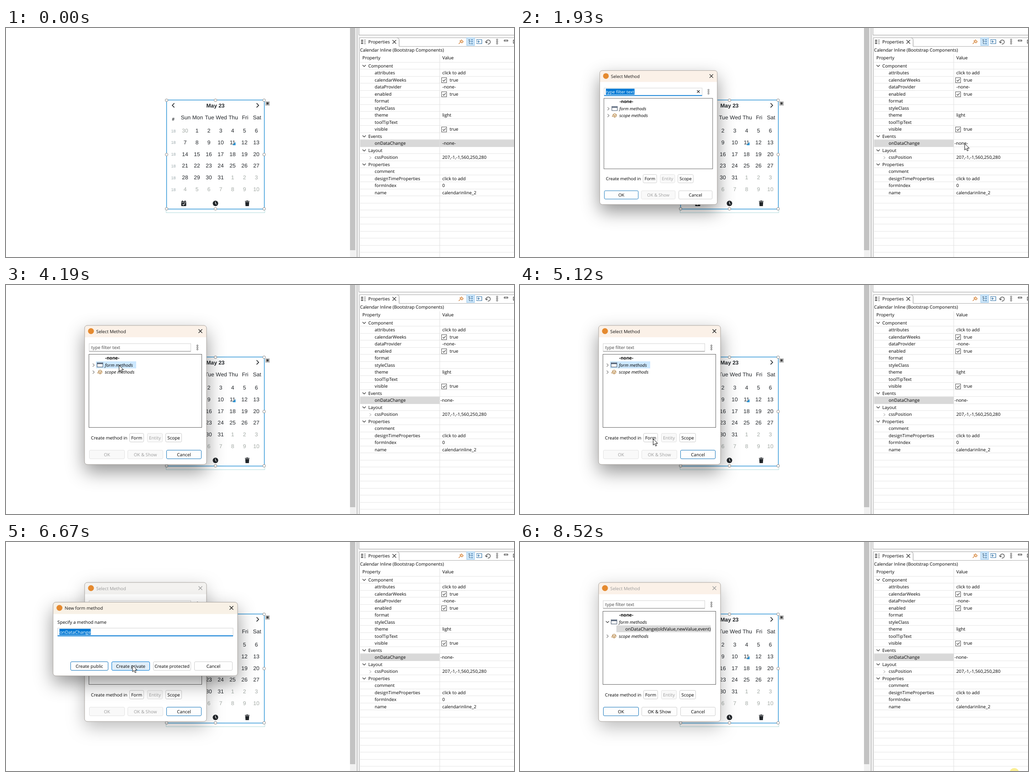
An HTML page that plays this animation: 1112x504 px, repeating every 8.59 s.

```html
<!DOCTYPE html>
<html lang="en">
<head>
<meta charset="utf-8">
<title>Calendar event handler</title>
<style>
  html, body { margin: 0; height: 100%; overflow: hidden; background: #fff; }
  svg { display: block; width: 1112px; height: 504px; text-rendering: geometricPrecision; }
  text { font: 9.8px "Open Sans", sans-serif; white-space: pre; }
  .cal text { font: 12px "Liberation Sans", Arial, sans-serif; text-anchor: middle; fill: #212529; }
  .cal .week { font-size: 9px; fill: #9aa8ab; }
  .cal .other { fill: #a3aaa5; }
  .bold, .cal .bold { font-weight: bold; }
  .italic { font-style: italic; }
  .mid { text-anchor: middle; }
</style>
</head>
<body>
<svg viewBox="0 0 1112 504"><g id="under"></g><g id="fixed"></g><g id="over"></g></svg>
<script>
const LOOP = 8590, ROW = 15.5, ROWS_TOP = 75.6, SELECTED = 11;
const BLUE = '#0078d4', PEACH = '#fbf1e8', PALE = '#f3f2f0';
const $ = id => document.getElementById(id);

const text = (x, y, s, attrs = '') => `<text x="${x}" y="${y}" ${attrs}>${s}</text>`;
const rect = (x, y, w, h, fill, attrs = '') =>
  `<rect x="${x}" y="${y}" width="${w}" height="${h}" fill="${fill}" ${attrs}/>`;
const path = (d, stroke = '#222', width = 1, fill = 'none') =>
  `<path d="${d}" stroke="${stroke}" stroke-width="${width}" fill="${fill}"/>`;
const circle = (x, y, r, fill, attrs = '') => `<circle cx="${x}" cy="${y}" r="${r}" fill="${fill}" ${attrs}/>`;
const cross = (x, y, r, color, width = 1) =>
  path(`M${x - r} ${y - r}l${2 * r} ${2 * r}m0 ${-2 * r}l${-2 * r} ${2 * r}`, color, width);
const right = (x, y, r, color, width) => path(`M${x - r / 2} ${y - r}l${r} ${r}l${-r} ${r}`, color, width);
const down = (x, y) => path(`M${x - 3.5} ${y - 1.8}l3.5 3.5l3.5 -3.5`, '#333', 1.2);
const dots = (x, y, gap) => [-gap, 0, gap].map(d => circle(x, y + d, 1.5, '#fff', 'stroke="#444" stroke-width=".9"')).join('');

function calendar() {
  let s = path('M350.5 398V406.5H566.5V398', '#b4dcdf') + rect(351.5, 158.5, 214, 240, '#fff', 'stroke="#2a93d5" stroke-width="1.4"');
  s += path('M368.5 165.5l-4.5 4.7l4.5 4.7M548.5 165.5l4.5 4.7l-4.5 4.7', '#212529', 1.6);
  s += text(458.5, 174.5, 'May 23', 'class="bold"') + text(366, 204, '#', 'style="font-size:10px" class="bold"');
  'Sun Mon Tue Wed Thu Fri Sat'.split(' ').forEach((d, i) => s += text(393.5 + 26 * i, 201.3, d));
  for (let i = 0; i < 42; i++) {
    const col = i % 7, y = 230 + 25.8 * Math.floor(i / 7);
    const other = i < 1 || i > 31;
    if (!col) s += text(366.5, y - .5, 18, 'class="week"');
    s += text(392 + 26 * col, y, i < 1 ? 30 : (i - 1) % 31 + 1, other ? 'class="other"' : '');
  }
  s += path('M502.5 251v7h-7z', 'none', 0, '#2a93d5');
  // footer icons
  s += rect(383.5, 381.5, 11, 10.5, '#212529', 'rx="1.3"') + path('M386 379.5v3M392 379.5v3', '#212529', 1.6)
     + path('M383.5 384h11', '#fff', .8) + path('M386.5 387.8l1.8 1.8l3.3 -3.4', '#fff', 1.2);
  s += circle(458.5, 386, 6, '#212529') + path('M458.5 382.3v4l2.4 1.6', '#fff', 1.2);
  s += path('M523 381.5h10M526.3 380.5h3.4', '#212529', 1.5) + path('M523.7 383h8.6l-.6 9h-7.4z', 'none', 0, '#212529');
  // resize handles
  for (const x of [351.5, 458.5, 565]) for (const y of [159, 278.5, 398])
    if (x !== 458.5 || y !== 278.5) s += circle(x, y, 3, '#fff', 'stroke="#888"');
  s += rect(568.5, 162.5, 8, 7.5, '#eee', 'stroke="#888"') + rect(570, 163.5, 5, 5, '#444');
  return `<g class="cal">${s}</g>`;
}

function frameAndToolbar() {
  let s = rect(753, 0, 12, 504, '#f1f1f1') + rect(753, 0, 11.5, 489, '#c3c3c3');
  s += rect(765, 0, 9, 504, '#f2f2f2') + path('M768.5 0V504', '#a0a0a0') + path('M772.5 0V15.5H1112', '#a8a8a8');
  s += rect(773, 16, 339, 5, '#f5f5f5') + path('M773.5 504V21.5H1112M860.5 40.5H1112', '#b0b0b0');
  s += path('M860.5 40.5V27q0 -5.5 -5 -5.5', '#999');
  s += path('M777 27h5M777 30.5h5M777 34h5', '#555', 2) + path('M784 26.5h4M784 30.5h4M784 34.5h4M785.5 25v11', '#999');
  s += text(793, 34, 'Properties') + cross(850, 30.5, 4, '#333', 1.1);
  s += path('M991 35l4 -4M993 28l5 5M994 29l3 -3l4 4l-3 3z', '#d1813a', 1.2, '#fbe3c8');
  s += rect(1008.5, 21.5, 17, 17, '#cde6f9', 'stroke="#99c9ee"') + path('M1014 25v9.5h3M1014 29.5h3M1012 26h4', '#4a6a85')
     + path('M1018 26h4M1018 30h4M1018 34.5h4', '#3d78ad', 1.5);
  s += path('M1030.5 28v-2.5h11v9h-11v-2M1029 30h7m-2.5 -2.5l2.5 2.5l-2.5 2.5', '#3a78aa', 1.2);
  s += path('M1051.5 32.5a4.5 4.5 0 1 1 3 2.7M1049 29.5l2.5 3.5l3 -2.5', '#444', 1.2);
  s += dots(1075, 30, 4.2) + rect(1090.5, 26.5, 8, 2.5, '#fff', 'stroke="#333"') + rect(1110.5, 26.5, 8, 7, '#fff', 'stroke="#333"');
  return s;
}

const PROPERTIES = ['*Component', 'attributes|click to add', 'calendarWeeks|true', 'dataProvider|-none-', 'enabled|true',
  'format', 'styleClass', 'theme|light', 'toolTipText', 'visible|true', '*Events', 'onDataChange', '*Layout',
  'cssPosition|207,-1,-1,560,250,280', '*Properties', 'comment', 'designTimeProperties|click to add', 'formIndex|0',
  'name|calendarinline_2'];

function propertyTable() {
  let s = text(775, 52, 'Calendar Inline (Bootstrap Components)') + text(780, 69, 'Property') + text(955, 69, 'Value');
  PROPERTIES.forEach((item, i) => {
    const y = 83.3 + ROW * i, [name, value] = item.split('|');
    if (name[0] === '*') {
      s += down(784, y) + text(793, y + 3.6, name.slice(1));
      return;
    }
    s += text(807, y + 3.6, name);
    if (name === 'cssPosition') s += right(797.5, y + .7, 3, '#888', 1);
    if (value === 'true')
      s += rect(953.5, y - 5, 11, 11, '#fff', 'stroke="#555"') + path(`M956 ${y + .6}l2.2 2.3l4.3 -4.8`, '#333', 1.1) + text(971, y + 3.6, value);
    else if (value) s += text(955, y + 3.6, value);
  });
  return s;
}

function tableBackground(t, mouse) {
  let s = '';
  for (let y = 75.5; y < 504; y += ROW) s += path(`M775 ${Math.round(y) - .5}H1112`, '#e6e6e6');
  const editing = t >= 1390;
  const hovered = t >= 120 && !editing ? Math.floor((mouse.y - ROWS_TOP) / ROW) : -1;
  const rowY = i => ROWS_TOP + ROW * i;
  if (hovered >= 0 && hovered < PROPERTIES.length && hovered !== SELECTED)
    s += rect(775, rowY(hovered), 337, ROW, '#e5f3ff');
  s += rect(775, rowY(SELECTED), editing ? 174 : 337, ROW, hovered === SELECTED ? '#cce8ff' : '#d9d9d9');
  s += path('M949.5 58V504', '#e0e0e0');
  return s + text(editing ? 951 : 955, rowY(SELECTED) + 11.3, '-none-');
}

function button(x, y, w, label, state = '') {
  const look = {
    '': ['#fefefe', '#cfcfcf', '#000'], off: ['#f9f9f9', '#e3e3e3', '#9d9d9d'],
    main: ['#fefefe', '#1a78bd', '#000'], hot: ['#e0eef9', BLUE, '#000'],
  }[state];
  return rect(x, y, w, 19, look[0], `rx="2.5" stroke="${look[1]}"`) +
    text(x + w / 2, y + 13, label, `class="mid" fill="${look[2]}"`);
}

function windowFrame(x, y, w, h, title, active, bar) {
  const shadow = active ? '0 16px 20px rgba(0,0,0,.42)' : '0 12px 19px rgba(0,0,0,.27)';
  const ink = active ? '#111' : '#999';
  return rect(x, y, w, h, '#fff', `rx="6" style="filter:drop-shadow(${shadow})"`) +
    path(`M${x} ${y + 26}v-20q0 -6 6 -6h${w - 12}q6 0 6 6v20z`, 'none', 0, bar) +
    rect(x, y, w, h, 'none', 'rx="6" stroke="#aaa5a0"') +
    circle(x + 14, y + 12.5, 6.5, '#e58a2f') + text(x + 25.5, y + 16.7, title, `fill="${ink}"`) +
    cross(x + w - 13.5, y + 12.5, 4, ink, 1.1);
}

function input(x, y, w, value, mark, focused) {
  let s = rect(x, y, w, 17, '#fff', 'stroke="#d3d3d3"') + path(`M${x} ${y + 17}h${w}`, focused ? BLUE : '#8a8a8a', focused ? 1.8 : 1);
  if (focused) s += rect(x + 4, y + 1.5, mark, 13.5, BLUE);
  return s + text(x + 4.5, y + 12, value, `fill="${focused ? '#fff' : '#444'}"`);
}

function selectDialog(t) {
  const fresh = t < 3380, created = t >= 7190, ready = t >= 7330;
  const active = t < 5400 || t >= 7190 && t < 8500;
  const bar = t >= 5400 && t < 7300 ? PALE : PEACH;
  let s = windowFrame(172, 89, 267, 306, 'Select Method', active, bar);
  s += input(182, 129, 222.5, 'type filter text', 65, fresh) + dots(419, 137.5, 4.2);
  if (fresh) s += cross(396, 137, 3, '#333', 1.3);
  s += rect(181.5, 152.5, 247, 161, '#fff', 'stroke="#666"');
  if (!created && t >= 2800) s += rect(197, 168, 88, 15.5, fresh ? '#e9f5ff' : '#cce8ff');
  s += text(217, 163.5, '-none-', 'class="bold"');
  s += created ? down(191.5, 176) : right(191.5, 176.3, 3.5, '#777', 1.1);
  s += rect(199.5, 171, 12.5, 9.5, '#fff', 'stroke="#44546a"') + path('M199.5 173h12.5', '#44546a', 2);
  s += text(216.5, 179.6, 'form methods', 'class="italic"');
  if (created) s += rect(211, 183.5, 206.5, 15, '#d9d9d9') + text(230.5, 194.6, 'onDataChange(oldValue,newValue,event)');
  const y = created ? 207 : 191.5;
  s += right(191.5, y + .3, 3.5, '#777', 1.1) + text(216.5, y + 3.7, 'scope methods', 'class="italic"');
  s += path(`M202 ${y - 2}l4 -2.5l4 2.5v4l-4 2.5l-4 -2.5zl4 2l4 -2m-4 2v4.5M199.5 ${y + 2}h3`, '#a9793f', 1, '#f7e6c9');
  s += text(186, 339.7, 'Create method in') + button(270.5, 326.5, 31, 'Form') +
    button(309.5, 326.5, 33, 'Entity', 'off') + button(349.5, 326.5, 35, 'Scope');
  const ok = fresh || ready;
  return s + button(182.5, 363.5, 77, 'OK', ok ? 'main' : 'off') +
    button(266.5, 363.5, 77, 'OK &amp; Show', ready ? '' : 'off') + button(351.5, 363.5, 76, 'Cancel', ok ? '' : 'main');
}

function nameDialog(t) {
  const hover = t >= 6250, clicked = t >= 7120;
  return windowFrame(103, 132.5, 404, 162, 'New form method', true, '#f8f1e6') +
    text(112.5, 180, 'Specify a method name') + input(113, 189.5, 384, 'onDataChange', 68.5, !clicked) +
    (clicked ? path('M113 206.5h384', BLUE, 1.5) : '') +
    button(141.5, 263.5, 82, 'Create public', clicked ? '' : 'main') + button(231.5, 263.5, 83, 'Create private', hover ? 'hot' : '') +
    button(322.5, 263.5, 82, 'Create protected') + button(412.5, 263.5, 83, 'Cancel');
}

const clamp = v => Math.min(1, Math.max(0, v));
const easeOut = v => 1 - (1 - clamp(v)) ** 3;
const smooth = v => v * v * (3 - 2 * v);

// group zoomed about (cx, cy) and faded
const zoomed = (content, cx, cy, scale, alpha) =>
  `<g opacity="${alpha}" transform="translate(${cx} ${cy}) scale(${scale}) translate(${-cx} ${-cy})">${content}</g>`;

function dialogs(t) {
  let s = '';
  if (t >= 1790) {
    const p = (t - 1790) / 300;
    s += zoomed(selectDialog(t), 242, 216, .88 + .12 * easeOut(p * .7), clamp(.25 + p * 1.7));
  }
  if (t >= 5400 && t < 7300) {
    const p = (t - 5400) / 220, out = clamp((t - 7160) / 125);
    s += zoomed(nameDialog(t), 255, 200, (.9 + .1 * easeOut(p)) * (1 - .056 * out), clamp(.2 + p * 1.3) * (1 - out));
  }
  return s;
}

const TRACK = [[120, 1102, 452], [390, 985, 281], [530, 985, 281], [860, 973, 254], [2050, 973, 254], [2260, 524, 364],
  [2460, 524, 364], [2920, 249, 178], [3110, 247, 176], [4190, 247, 176], [4250, 235, 176], [4870, 235, 176],
  [5080, 291, 338], [5400, 291, 338], [5600, 288.5, 337], [5980, 288.5, 337], [6390, 276, 272], [6600, 276, 272],
  [6790, 278, 269.5], [7990, 278, 269.5], [8450, 1082, 508]];
const CLICKS = [1390, 3380, 4390, 5190, 7120, 8500];

function mouseAt(t) {
  const next = TRACK.findIndex(k => k[0] > t);
  const [t1, x1, y1] = TRACK.at(next);
  const [t0, x0, y0] = TRACK[Math.max(0, next - 1)];
  const p = next < 0 ? 1 : smooth(clamp((t - t0) / (t1 - t0)));
  return next === 0 ? { x: x1, y: y1 } : { x: x0 + (x1 - x0) * p, y: y0 + (y1 - y0) * p };
}

function pointer(t, { x, y }) {
  if (t < 120) return '';
  const clicked = CLICKS.some(c => t >= c && t < c + 90);
  return (clicked ? circle(x, y, 10.5, '#f7e55a', 'opacity=".65"') : '') +
    path(`M${x + .5} ${y + .5}v14l3.2 -3l2.2 5l2.3 -1l-2.2 -4.9h4.4z`, '#111', 1, '#fff');
}

$('fixed').innerHTML = calendar() + frameAndToolbar() + propertyTable();

function draw(now) {
  const t = now % LOOP, mouse = mouseAt(t);
  $('under').innerHTML = tableBackground(t, mouse);
  $('over').innerHTML = dialogs(t) + pointer(t, mouse);
  requestAnimationFrame(draw);
}
draw(performance.now());
</script>
</body>
</html>
```
